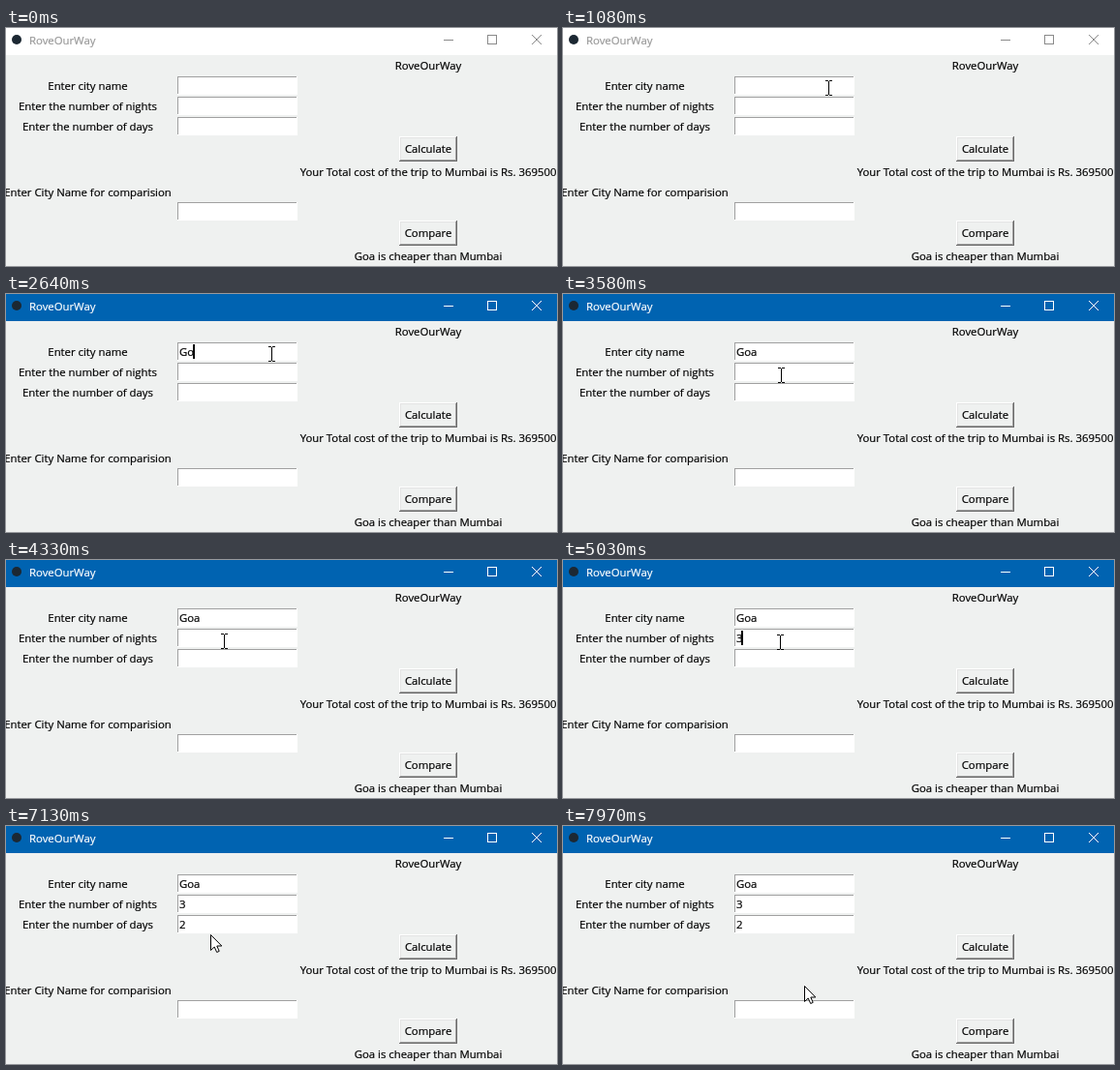
Write an HTML page that moves like this. It is 569 px wide and 246 px high and loops after 8000 ms.

```html
<!DOCTYPE html>
<html lang="en">
<head>
<meta charset="utf-8">
<title>RoveOurWay</title>
<style>
  html, body { margin: 0; width: 100%; height: 100%; overflow: hidden; background: #eff1f0; }
  svg { display: block; width: 569px; height: 246px; }
  text {
    font: 11.35px "Open Sans", "Noto Sans", sans-serif;
    fill: currentColor; stroke: currentColor; stroke-width: .2px;
    color: #000; white-space: pre;
  }
  .mid { text-anchor: middle; }
  rect, .crisp { shape-rendering: crispEdges; }
</style>
</head>
<body>
<svg id="stage" viewBox="0 0 569 246"></svg>
<script>
const LOOP = 8000;
const TICK = 77;        // time between pointer positions
const ACTIVE = 1160;    // window gains focus
const BLINK = { on: 600, off: 300 };
const NAME = "RoveOurWay";
const FACE = "#eff1f0";
const ENTRY = { x: 177, w: 124, h: 19 };
const COLUMNS = [84.5, 436];

// Entries: top edge, focus time, text and the time of each key
const fields = [
  { y: 50, focus: ACTIVE, text: "Goa", keys: [2170, 2640, 2790] },
  { y: 71, focus: 3720, text: "3", keys: [4650] },
  { y: 92, focus: 5570, text: "2", keys: [6730] },
  { y: 180, focus: Infinity, text: "", keys: [] }
];

// Pointer moves: start, end, x, y
const START = [515, 255];
const moves = [
  [320, 620, 349, 86],
  [780, 1080, 274, 62],
  [3030, 3580, 225, 84],
  [5030, 5660, 209, 109],
  [7070, 7590, 258, 175],
  [7970, 7970, 249, 165]
];

const rect = (x, y, w, h, fill, extra = "") =>
  `<rect x="${x}" y="${y}" width="${w}" height="${h}" fill="${fill}" ${extra}/>`;
const label = (col, y, text) =>
  `<text class="mid" x="${COLUMNS[col]}" y="${y}">${text}</text>`;

const entry = ({ y }) =>
  rect(ENTRY.x, y, ENTRY.w, ENTRY.h, "#fff") +
  rect(ENTRY.x, y, ENTRY.w - 1, 1, "#a0a0a0") +
  rect(ENTRY.x, y, 1, ENTRY.h - 1, "#a0a0a0") +
  `<text class="value" x="${ENTRY.x + 2}" y="${y + 14}"></text>`;

// Raised bevel: each layer leaves one lit or shaded edge of the last
const button = (y, text) =>
  rect(406, y, 60, 26, "#696969") +
  rect(406, y, 59, 25, "#fff") +
  rect(407, y + 1, 58, 24, "#a0a0a0") +
  rect(407, y + 1, 57, 23, "#e3e3e3") +
  rect(408, y + 2, 56, 22, FACE) +
  label(1, y + 17, text);

const stage = document.getElementById("stage");
stage.innerHTML =
  rect(0, 0, 569, 246, FACE) +
  rect(0, 0, 569, 28, "#fff", 'id="bar"') +
  `<circle cx="11" cy="12" r="5" fill="#1c2833"/>
   <text id="title" x="24" y="17">${NAME}</text>
   <g id="controls" fill="none">
     <path class="crisp" d="M452 12.5H462M497.5 7.5H506.5V16.5H497.5Z"/>
     <path d="M543 7L553 17M553 7L543 17"/>
   </g>` +
  ["city name", "the number of nights", "the number of days"]
    .map((s, i) => label(0, 64 + 21 * i, "Enter " + s)).join("") +
  label(0, 174, "Enter City Name for comparision") +
  label(1, 43, NAME) +
  label(1, 153, "Your Total cost of the trip to Mumbai is Rs. 369500") +
  label(1, 240, "Goa is cheaper than Mumbai") +
  fields.map(entry).join("") +
  button(112, "Calculate") +
  button(199, "Compare") +
  rect(0, 0, 2, 15, "#000", 'id="caret"') +
  `<path id="arrow" d="M.5 .5V16.5L4.2 13L6.7 18.5L9.2 17.4L6.8 12H11.8Z" fill="#fff" stroke="#000"/>
   <path id="beam" class="crisp" fill="none" stroke="#000"
     d="M-3 -7.5H0M1 -7.5H4M.5 -7V7M-3 7.5H0M1 7.5H4"/>`;

const [bar, title, controls, caret, arrow, beam] =
  ["bar", "title", "controls", "caret", "arrow", "beam"].map(id => document.getElementById(id));
const values = [...stage.querySelectorAll(".value")];

const ease = u => u * u * (3 - 2 * u);

function pointerAt(t) {
  let [x, y] = START;
  for (const [from, to, tx, ty] of moves) {
    if (t < from) break;
    const steps = Math.round((to - from) / TICK) + 1;
    const step = Math.floor((t - from) / TICK) + 1;
    const u = t >= to ? 1 : ease(Math.min(1, step / steps));
    x += (tx - x) * u;
    y += (ty - y) * u;
  }
  return [Math.round(x), Math.round(y)];
}

const overEntry = (x, y) =>
  x >= ENTRY.x && x < ENTRY.x + ENTRY.w &&
  fields.some(f => y >= f.y && y < f.y + ENTRY.h);

const show = (node, on) => node.setAttribute("visibility", on ? "visible" : "hidden");

function drawCaret(t) {
  const i = fields.filter(f => f.focus <= t).length - 1;
  const on = i >= 0 && (t - fields[i].focus) % (BLINK.on + BLINK.off) < BLINK.on;
  show(caret, on);
  if (!on) return;
  const width = values[i].textContent ? values[i].getComputedTextLength() : 0;
  caret.setAttribute("x", ENTRY.x + 1 + Math.floor(width));
  caret.setAttribute("y", fields[i].y + 2);
}

function draw(t) {
  const active = t >= ACTIVE;
  bar.setAttribute("fill", active ? "#0063b1" : "#fff");
  title.style.color = active ? "#fff" : "#999";
  controls.setAttribute("stroke", active ? "#fff" : "#8a8a8a");

  fields.forEach((f, i) => {
    const text = f.text.slice(0, f.keys.filter(k => k <= t).length);
    if (values[i].textContent !== text) values[i].textContent = text;
  });
  drawCaret(t);

  const [x, y] = pointerAt(t);
  const inside = t >= moves[0][0];
  const text = overEntry(x, y);
  show(arrow, inside && !text);
  show(beam, inside && text);
  for (const p of [arrow, beam]) p.setAttribute("transform", `translate(${x} ${y})`);
}

const begin = performance.now();
function tick() {
  draw((performance.now() - begin) % LOOP);
  requestAnimationFrame(tick);
}
draw(0);
requestAnimationFrame(tick);
</script>
</body>
</html>
```
